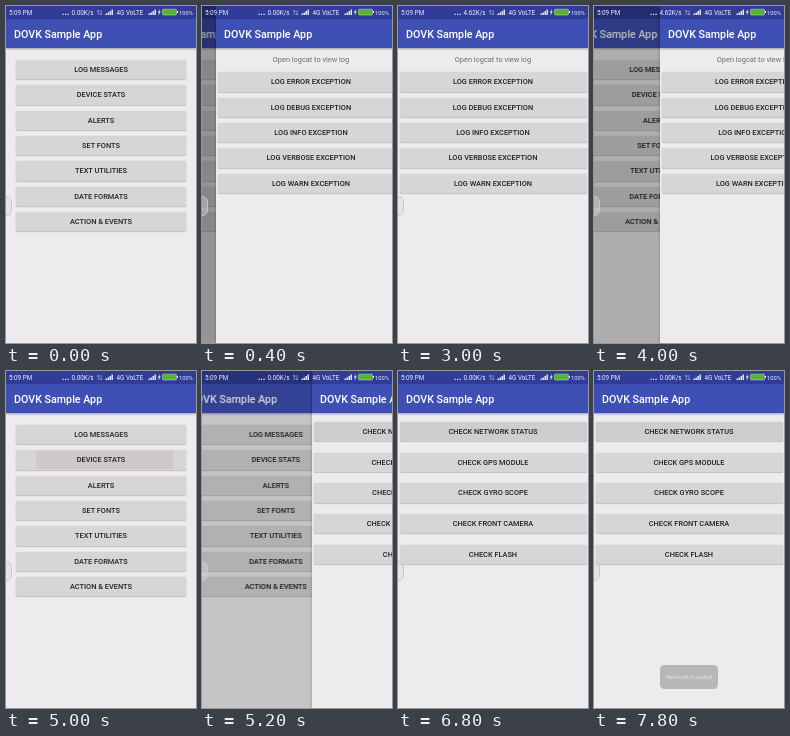
These frames come from a looping animation (190x337 px, 8000 ms). An HTML page:

```html
<!DOCTYPE html>
<html lang="en">
<head>
<meta charset="utf-8">
<title>Sample App</title>
<style>
/* --x is the left edge of the incoming page: 0 covers the home page, 200 is off screen */
@property --x { syntax: "<number>"; inherits: true; initial-value: 200; }

html, body { margin: 0; width: 100%; height: 100%; overflow: hidden; }
.stage {
  position: relative; width: 190px; height: 337px; overflow: hidden;
  font: 500 7.39px/1 Roboto, sans-serif; color: #202022;
  animation: slide 8s step-end infinite;
}
.page { position: absolute; inset: 0; background: #eeebee; }
.page::before {
  content: ""; position: absolute; inset: 0 0 auto; height: 13px; background: #303c98; z-index: 1;
}
header {
  position: absolute; top: 13px; width: 182px; height: 29px; padding-left: 8px;
  background: #3f50b4; color: #fff; font-size: 10.7px; line-height: 31.4px;
  white-space: nowrap; box-shadow: 0 1px 2px #0005;
}
.button {
  position: absolute; left: var(--inset); right: var(--inset);
  top: calc(var(--top) + var(--i) * var(--pitch)); height: 19.4px;
  border-radius: 1.2px; background: #d7d5d7; box-shadow: 0 .6px 1.2px #0005;
  text-align: center; line-height: 20px; white-space: nowrap;
}
.home {
  --inset: 10px; --top: 53.8px; --pitch: 25.35px;
  transform: translateX(calc(min(0, var(--x) - 190) * .265px));
}
.dim {
  position: absolute; inset: 0; background: #000;
  opacity: calc((190 - var(--x)) / 190 * .4);
}
.sub {
  --inset: 1.5px; transform: translateX(calc(var(--x) * 1px));
  box-shadow: 0 0 3px #0004;
}
.log { --top: 66.2px; --pitch: 25.35px; animation: first 8s step-end infinite; }
.stats { --top: 51.1px; --pitch: 30.6px; animation: second 8s step-end infinite; }
.stats header + .button { background: #d0cdd0; }
.hint {
  position: absolute; top: 50px; width: 100%; text-align: center;
  font-weight: 400; color: #6d6b6e;
}
.pressed {
  position: absolute; left: 30px; top: 80px; width: 137px; height: 18px;
  background: #b9a9b3; opacity: 0; mix-blend-mode: multiply;
  animation: press 8s step-end infinite;
}
.handle {
  position: absolute; left: -13px; top: 189.5px; width: 16.5px; height: 18px;
  border: .8px solid #c9c7ca; border-radius: 6px; background: #d8d6d960;
}
.toast {
  position: absolute; left: 66px; top: 294px; width: 58px; height: 24px;
  border-radius: 4.5px; background: #b8b6b8; color: #e6e4e6;
  font-size: 6.1px; font-weight: 400; line-height: 24.4px; text-align: center;
  opacity: 0; animation: toast 8s step-end infinite;
}
.status { position: absolute; left: 0; top: 0; font: 400 6.3px Roboto, sans-serif; fill: #f2f2fa; }
.idle { animation: idle 8s step-end infinite; }
.busy { animation: busy 8s step-end infinite; }

@keyframes slide {
  0% { --x: 200; }
  2.5% { --x: 118; }
  5% { --x: 14; }
  7.5% { --x: 0; }
  50% { --x: 66; }
  52.5% { --x: 172; }
  55% { --x: 200; }
  65% { --x: 110; }
  67.5% { --x: 12; }
  70%, 100% { --x: 0; }
}
@keyframes first { 0% { visibility: visible; } 55%, 100% { visibility: hidden; } }
@keyframes second { 0% { visibility: hidden; } 55%, 100% { visibility: visible; } }
@keyframes press { 0% { opacity: 0; } 55% { opacity: .18; } 65%, 100% { opacity: 0; } }
@keyframes idle { 0% { opacity: 1; } 10% { opacity: 0; } 62.5%, 100% { opacity: 1; } }
@keyframes busy { 0% { opacity: 0; } 10% { opacity: 1; } 62.5%, 100% { opacity: 0; } }
@keyframes toast { 0% { opacity: 0; } 97.5%, 100% { opacity: 1; } }
</style>
</head>
<body>
<div class="stage">
  <section class="page home" data-buttons="LOG MESSAGES|DEVICE STATS|ALERTS|SET FONTS|TEXT UTILITIES|DATE FORMATS|ACTION &amp; EVENTS">
    <header>DOVK Sample App</header>
  </section>
  <section class="page sub log" data-buttons="LOG ERROR EXCEPTION|LOG DEBUG EXCEPTION|LOG INFO EXCEPTION|LOG VERBOSE EXCEPTION|LOG WARN EXCEPTION">
    <header>DOVK Sample App</header>
    <div class="hint">Open logcat to view log</div>
  </section>
  <section class="page sub stats" data-buttons="CHECK NETWORK STATUS|CHECK GPS MODULE|CHECK GYRO SCOPE|CHECK FRONT CAMERA|CHECK FLASH">
    <header>DOVK Sample App</header>
  </section>

  <svg class="status" width="190" height="13">
    <defs>
      <path id="signal" d="M0 9V7.6h1.4V9zM2 9V6.4h1.4V9zM4 9V5h1.4V9zM6 9V3.4h1.4V9z"/>
    </defs>
    <text x="3" y="8.8">5:09 PM</text>
    <path d="M56.5 7.7h1.2v1.2h-1.2zM59 7.7h1.2v1.2H59zM61.5 7.7h1.2v1.2h-1.2z"/>
    <text class="idle" x="65.5" y="8.8">0.00K/s</text>
    <text class="busy" x="65.5" y="8.8">4.62K/s</text>
    <path d="M92.3 9V4M91 5.5l1.3-1.5 1.3 1.5M95 4v5M93.7 7.5L95 9l1.3-1.5" fill="none" stroke="#a9add6" stroke-width=".7"/>
    <use href="#signal" x="99.5"/>
    <text x="110.5" y="8.8">4G VoLTE</text>
    <use href="#signal" x="142.5"/>
    <path d="M154 3l-2.3 3.6h1.4L152.4 9.5l2.4-3.9h-1.5z"/>
    <rect x="156.5" y="3.2" width="14" height="5.8" rx=".8" fill="#55b52e" stroke="#cfe0cc" stroke-width=".5"/>
    <path d="M171 5h1v2h-1z"/>
    <text x="173" y="8.6" font-size="5.8">100%</text>
  </svg>
  <div class="handle"></div>
  <div class="toast">Network Enabled</div>
</div>
<script>
function addDiv(parent, className, text = "") {
  const div = document.createElement("div");
  div.className = className;
  div.textContent = text;
  parent.append(div);
  return div;
}

for (const page of document.querySelectorAll(".page")) {
  page.dataset.buttons.split("|").forEach((label, i) => {
    addDiv(page, "button", label).style.setProperty("--i", i);
  });
}

const home = document.querySelector(".home");
addDiv(home, "pressed");
addDiv(home, "dim").style.zIndex = 2;
</script>
</body>
</html>
```
